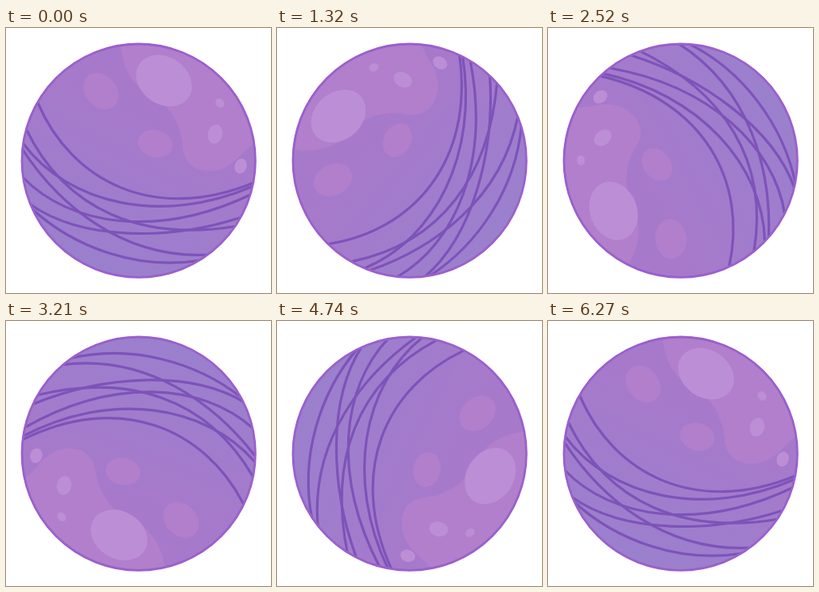
An HTML page that plays this animation: 332x332 px, repeating every 6.3 s.

```html
<!DOCTYPE html>
<html lang="en">
<head>
<meta charset="utf-8">
<title>Spinning ball</title>
<style>
  html, body { margin: 0; width: 100%; height: 100%; overflow: hidden; background: #fff; }
  svg { display: block; width: 100vw; height: 100vh; }
</style>
</head>
<body>
<svg viewBox="0 0 332 332">
  <defs>
    <linearGradient id="body" gradientUnits="userSpaceOnUse" x1="98" y1="300" x2="188" y2="120">
      <stop offset="0" stop-color="#9a80cd"/>
      <stop offset="1" stop-color="#a779cb"/>
    </linearGradient>
    <clipPath id="disc"><circle cx="166" cy="166" r="147"/></clipPath>
  </defs>
  <g id="ball" clip-path="url(#disc)">
    <circle cx="166" cy="166" r="147" fill="url(#body)"/>
    <!-- soft light patch -->
    <path fill="#b17fcc" d="M143 15C145 45 154 70 185 87C204 98 211 111 216 124C224 142 218 155 228 167C236 180 262 183 277 173C292 166 296 152 318 141V0H143Z"/>
    <g fill="#b27fcd">
      <ellipse rx="25" ry="19.5" transform="translate(119 79) rotate(50)"/>
      <ellipse rx="22" ry="17" transform="translate(187 145) rotate(15)"/>
    </g>
    <g fill="#bc8ed6">
      <ellipse rx="37.5" ry="29.5" transform="translate(198 66) rotate(35)"/>
      <ellipse rx="12" ry="9.2" transform="translate(262 133) rotate(104)"/>
      <ellipse rx="6.2" ry="5" transform="translate(268 94) rotate(50)"/>
      <ellipse rx="9.5" ry="7.5" transform="translate(294 173) rotate(108)"/>
    </g>
    <!-- threads -->
    <g fill="none" stroke="#7d53b9" stroke-width="3.2" stroke-linecap="round">
      <path d="M40 94C82 192 185 245 310 194"/>
      <path d="M21 144C78 221 195 248 310 198"/>
      <path d="M25 126C75 230 172 268 290 248"/>
      <path d="M20 151C65 220 145 290 254 284"/>
      <path d="M21 187C80 248 190 264 306 209"/>
      <path d="M29 220C95 267 205 266 292 238"/>
      <path d="M32 226C85 275 165 304 244 291"/>
    </g>
  </g>
  <circle cx="166.2" cy="166.2" r="146.2" fill="none" stroke="#9a60cc" stroke-width="2.8"/>
</svg>
<script>
  const ball = document.getElementById('ball');
  const STEP = 30, STEPS = 210;
  const start = performance.now();

  // The first and last steps share one pose, so a turn spans STEPS - 1 steps.
  function draw() {
    const step = Math.floor((performance.now() - start) / STEP) % STEPS;
    ball.setAttribute('transform', `rotate(${-360 * step / (STEPS - 1)} 166 166)`);
    requestAnimationFrame(draw);
  }
  draw();
</script>
</body>
</html>
```
